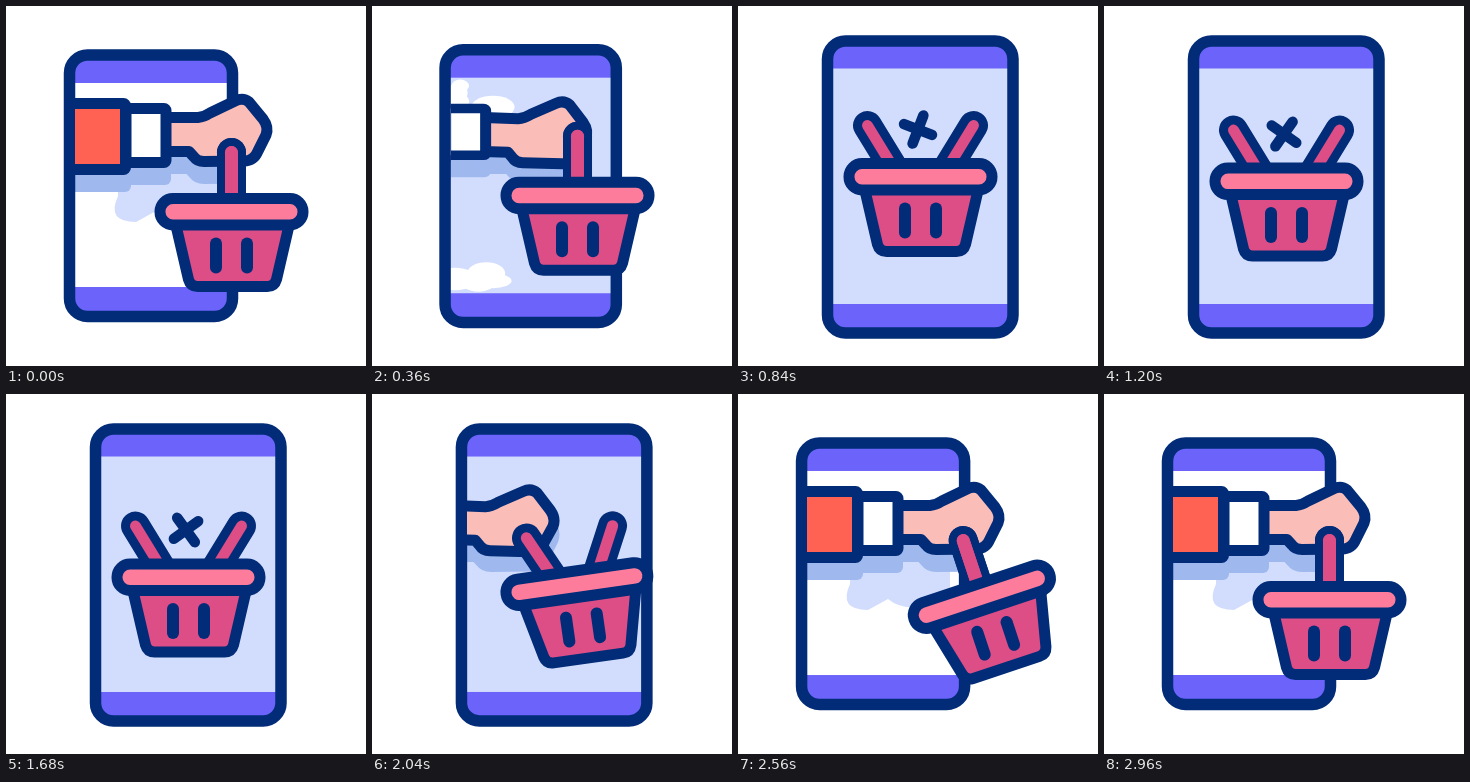
Write an HTML page with a canvas that moves like this. It is 360x360 px and loops after 3 s.

```html
<!DOCTYPE html>
<html lang="en">
<head>
<meta charset="utf-8">
<title>Mobile shopping</title>
<style>
html, body { margin: 0; width: 100%; height: 100%; overflow: hidden; background: #fff; }
canvas { display: block; width: 360px; height: 360px; }
</style>
</head>
<body>
<canvas id="stage"></canvas>
<script>
const LOOP = 3000, STEP = 40, LINE = 11, TURN = Math.PI * 2;
const INK = '#022c78', BAR = '#6b63fa', SCREEN = '#d2ddfd', SHADE = '#9fb9ef';
const SKIN = '#fbbdb8', SLEEVE = '#ff6152', RIM = '#fd7c9c', BODY = '#dd4d86';

const canvas = document.getElementById('stage');
const ctx = canvas.getContext('2d');
const dpr = window.devicePixelRatio || 1;
canvas.width = canvas.height = 360 * dpr;

const mix = (a, b, p) => a + (b - a) * p;
const phase = (t, from, to) => Math.min(1, Math.max(0, (t - from) / (to - from)));
const easeIn = u => u * u;
const easeInOut = u => u < 0.5 ? 2 * u * u : 1 - 2 * (1 - u) * (1 - u);

// Rises from 0 to 1 between a and b, falls back to 0 between c and d.
const pulse = (a, b, c, d, ease = easeInOut) => t =>
  ease(phase(t, a, b)) * (t < c ? 1 : ease(1 - phase(t, c, d)));

const grown = pulse(120, 680, 2020, 2580);
const armAway = pulse(100, 640, 1780, 2480, easeIn);
const basketIn = pulse(90, 650, 1800, 2390);
const handlesOpen = pulse(380, 680, 1860, 2460);
const swung = pulse(1760, 2360, 2540, 2900);
const itemOut = pulse(620, 780, 1760, 1900);
const sink = t => easeInOut(phase(t, 840, 1680));

const gripX = t => mix(225.5, 182.5, basketIn(t));
const gripY = t => mix(147.5, mix(112.5, 125, sink(t)), basketIn(t));

const FIST = new Path2D('M158 111.5H192Q198 111 204 107L229 95Q237 91 243 96L257 113' +
  'Q263 121 260 129L252 145Q248 155 238 155L198 155.5Q191 155.5 188 151L183 145.5H158Z');
const BASKET = new Path2D('M-56 12L-43 68Q-41 75 -34 75H36Q43 75 45 68L58 12Z');
const GLOW = new Path2D('M112 165V190Q100 216 130 216L150 205Q170 222 212 205V165Z');

function box(x, y, w, h, r) {
  ctx.beginPath();
  ctx.roundRect(x, y, w, h, r);
}

function outlined(fill, path) {
  ctx.lineWidth = LINE;
  ctx.strokeStyle = INK;
  ctx.fillStyle = fill;
  if (path) { ctx.fill(path); ctx.stroke(path); }
  else { ctx.fill(); ctx.stroke(); }
}

function line(x1, y1, x2, y2, width, color) {
  ctx.beginPath();
  ctx.moveTo(x1, y1);
  ctx.lineTo(x2, y2);
  ctx.lineWidth = width;
  ctx.strokeStyle = color;
  ctx.stroke();
}

function group(draw) {
  ctx.save();
  draw();
  ctx.restore();
}

function rotate(degrees) {
  ctx.rotate(degrees * Math.PI / 180);
}

function seeded(seed) {
  return () => (seed = seed * 16807 % 2147483647) / 2147483647;
}

function phoneAt(t) {
  const p = grown(t);
  const x = mix(63.5, 89.5, p), y = mix(49, 35, p);
  return {
    p, x, y, w: mix(226.5, 275, p) - x, h: mix(310.5, 327, p) - y,
    top: mix(77, 62.5, p), bottom: mix(281, 298, p)
  };
}

// The arm flattens and the wrist dips as the arm withdraws.
function drawArm(shift) {
  group(() => {
    ctx.translate(-shift, 0);
    group(() => {
      ctx.translate(159, 127);
      rotate(Math.min(2, shift / 20));
      ctx.translate(-159, -127);
      outlined(SKIN, FIST);
    });
    ctx.translate(0, 102.5);
    ctx.scale(1, 1 - Math.min(shift, 50) / 350);
    box(120, 0, 40, 54, 2);
    outlined('#fff');
    box(-120, -5, 239.5, 66, 2);
    outlined(SLEEVE);
  });
}

function drawShade(shift) {
  group(() => {
    ctx.translate(-shift, 17);
    ctx.fillStyle = ctx.strokeStyle = SHADE;
    box(-120, 92, 245, 77 - Math.min(shift, 50) / 6, 6);
    ctx.fill();
    box(114, 97, 51, 65 - Math.min(shift, 50) / 6, 6);
    ctx.fill();
    ctx.lineWidth = LINE;
    ctx.fill(FIST);
    ctx.stroke(FIST);
  });
}

// White patches of glare along the left of the screen, near both bars.
function drawGlare({ p, x, top, bottom }) {
  const random = seeded(41), size = (1 - p) / 0.5;
  ctx.fillStyle = '#fff';
  for (let i = 0; i < 8; i++) {
    const cx = x + 10 + random() * 45, off = 4 + random() * 26;
    const rx = 5 + random() * 13, ry = 4 + random() * 6;
    ctx.beginPath();
    ctx.ellipse(cx, i % 2 ? top + off : bottom - off, rx * size, ry * size, 0, 0, TURN);
    ctx.fill();
  }
}

function drawPhone(phone, shift) {
  const { p, x, y, w, h, top, bottom } = phone;
  group(() => {
    box(x, y, w, h, 17);
    ctx.clip();
    const resting = p < 0.1;
    ctx.fillStyle = resting ? '#fff' : SCREEN;
    ctx.fillRect(x, y, w, h);
    if (resting) {
      ctx.fillStyle = SCREEN;
      ctx.fill(GLOW);
    } else {
      drawGlare(phone);
    }
    drawShade(shift);
    ctx.fillStyle = BAR;
    ctx.fillRect(x, y, w, top - y);
    ctx.fillRect(x, bottom, w, y + h - bottom);
  });
  box(x, y, w, h, 18);
  ctx.lineWidth = LINE + 0.5;
  ctx.strokeStyle = INK;
  ctx.stroke();
}

function drawItem(t) {
  const size = itemOut(t);
  if (!size) return;
  group(() => {
    ctx.translate(180, gripY(t) + mix(50, 11, size));
    rotate(21 + (t - 840) * 33 / 840);
    ctx.scale(size, size);
    line(-15, 0, 15, 0, 10.5, INK);
    line(0, -15, 0, 15, 10.5, INK);
  });
}

function drawBasket(t) {
  const k = handlesOpen(t);
  const handles = (width, color) => {
    for (const side of [-1, 1]) {
      line(side * 53 * k, mix(-59, -51, k), side * 23 * k, -2, width, color);
    }
  };
  group(() => {
    ctx.translate(gripX(t), gripY(t));
    rotate(-18.5 * swung(t));
    ctx.translate(0, 58);
    handles(29, INK);
    handles(13 - 2 * k, BODY);
    outlined(BODY, BASKET);
    for (const x of [-15.5, 15.5]) line(x, 32, x, 56, 12, INK);
    box(-71.5, -13, 143, 26.5, 13);
    outlined(RIM);
  });
}

function render(t) {
  ctx.setTransform(dpr, 0, 0, dpr, 0, 0);
  ctx.fillStyle = '#fff';
  ctx.fillRect(0, 0, 360, 360);
  ctx.lineCap = ctx.lineJoin = 'round';
  const phone = phoneAt(t), shift = 200 * armAway(t);
  drawPhone(phone, shift);
  group(() => {
    ctx.beginPath();
    ctx.rect(phone.x + LINE / 2, 0, 360, 360);
    ctx.clip();
    drawArm(shift);
  });
  drawItem(t);
  drawBasket(t);
}

const start = performance.now();
function tick() {
  const t = (performance.now() - start) % LOOP;
  render(Math.floor(t / STEP) * STEP);
  requestAnimationFrame(tick);
}
tick();
</script>
</body>
</html>
```
